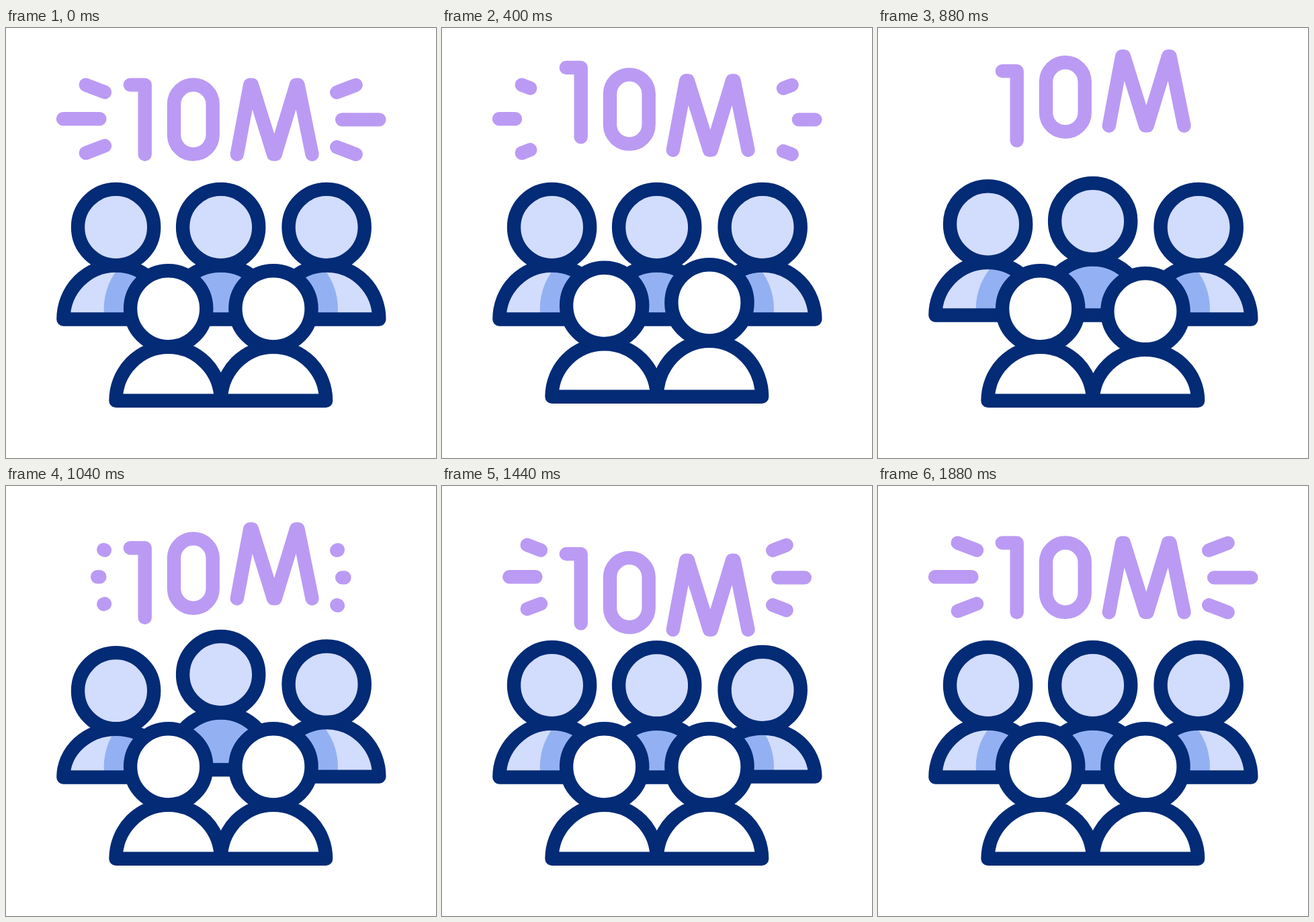
Write an HTML page that moves like this. It is 640 px wide and 640 px high and loops after 2000 ms.

```html
<!DOCTYPE html>
<html lang="en">
<head>
<meta charset="utf-8">
<title>10M people</title>
<style>
  html, body { margin: 0; width: 100%; height: 100%; overflow: hidden; background: #fff; }
  svg { display: block; width: 100%; height: 100%; }
  .navy { stroke: #032b76; }
  .purple { stroke: #bb9af4; fill: none; }
  svg * { stroke-width: 20.4; stroke-linecap: round; stroke-linejoin: round; }
</style>
</head>
<body>
<svg id="stage" viewBox="0 0 640 640"></svg>
<script>
const LOOP = 2000, STEP = 40;
const LIGHT = '#d2dcfd', SHADE = '#93b1f2', WHITE = '#fff';
const stage = document.getElementById('stage');

function add(parent, tag, attrs) {
  const el = document.createElementNS('http://www.w3.org/2000/svg', tag);
  for (const key in attrs) el.setAttribute(key, attrs[key]);
  parent.appendChild(el);
  return el;
}

// Eased interpolation through [time, value] keys.
function track(keys, t) {
  if (t <= keys[0][0]) return keys[0][1];
  for (let i = 1; i < keys.length; i++) {
    const [t0, v0] = keys[i - 1], [t1, v1] = keys[i];
    if (t < t1) {
      const x = (t - t0) / (t1 - t0);
      return v0 + (v1 - v0) * x * x * (3 - 2 * x);
    }
  }
  return keys[keys.length - 1][1];
}

const HEAD = [[40, 0], [280, -18], [520, 9], [740, 0]];
const BASE = [[40, 0], [280, -12], [520, 0]];
const GLYPH = [[120, 0], [640, -46], [1240, 26.5], [1720, 0]];
const RAY_OUT = [[120, 0], [640, 1]];
const RAY_IN = [[920, 0], [1720, 1]];

// Shoulders: a half ellipse whose top follows the head and whose base moves on its own.
function bodyPath(cx, base, top) {
  const rx = 78.2;
  return `M${cx - rx} ${base}A${rx} ${base - top} 0 0 1 ${cx + rx} ${base}Z`;
}

function person(cx, headY, delay, bodyFill, headFill, shadeX) {
  const body = add(stage, 'path', { fill: bodyFill });
  const paths = [body];
  if (shadeX) {
    const id = 'clip' + delay;
    paths.push(add(add(stage, 'clipPath', { id }), 'path', {}));
    add(stage, 'circle', { cx: shadeX, cy: 418, r: 96, fill: SHADE, 'clip-path': `url(#${id})` });
  }
  paths.push(add(stage, 'path', { class: 'navy', fill: 'none' }));
  const head = add(stage, 'circle', { class: 'navy', cx, r: 56.6, fill: headFill });
  return t => {
    const lift = track(HEAD, t - delay);
    const d = bodyPath(cx, headY + 137 + track(BASE, t - delay), headY + 57 + lift);
    paths.forEach(p => p.setAttribute('d', d));
    head.setAttribute('cy', headY + lift);
  };
}

function glyph(d, delay) {
  const el = add(stage, 'path', { class: 'purple', d });
  return t => el.setAttribute('transform', `translate(0 ${track(GLYPH, t - delay)})`);
}

// A ray retreats to its outer end, then grows back from its inner end.
function ray(x0, y0, x1, y1) {
  const el = add(stage, 'path', { class: 'purple' });
  const at = k => `${x0 + (x1 - x0) * k} ${y0 + (y1 - y0) * k}`;
  return t => {
    const growing = t > 780;
    const from = growing ? 0 : track(RAY_OUT, t);
    const to = growing ? track(RAY_IN, t) : 1;
    el.setAttribute('d', to > from ? `M${at(from)}L${at(to)}` : '');
  };
}

const parts = [
  person(163.6, 296.5, 480, LIGHT, LIGHT, 241.7),
  person(319.7, 296.5, 720, SHADE, LIGHT),
  person(477.2, 296.5, 960, LIGHT, LIGHT, 398),
  person(241.7, 417.8, 0, WHITE, WHITE),
  person(398, 417.8, 240, WHITE, WHITE),
  glyph('M184.8 84.6H206.7V188', 0),
  glyph('M250 113.4a28.85 28.85 0 0 1 57.7 0v45.6a28.85 28.85 0 0 1 -57.7 0z', 80),
  glyph('M343.8 188L363.2 84.7H366L398 187.8H400.8L432 84.7H434.6L455.6 188', 160),
  ray(139.4, 135.3, 85, 135.3),
  ray(147, 95.6, 118.8, 84.7),
  ray(147, 175.3, 118.8, 186.1),
  ray(500.2, 136.4, 555.4, 136.4),
  ray(492.3, 95.8, 520.6, 84.9),
  ray(492.3, 177.2, 520.6, 188)
];

function draw(now) {
  const t = Math.floor((now % LOOP) / STEP) * STEP;
  parts.forEach(update => update(t));
}

let start;
function tick(now) {
  if (start === undefined) start = now;
  draw(now - start);
  requestAnimationFrame(tick);
}
draw(0);
requestAnimationFrame(tick);
</script>
</body>
</html>
```
